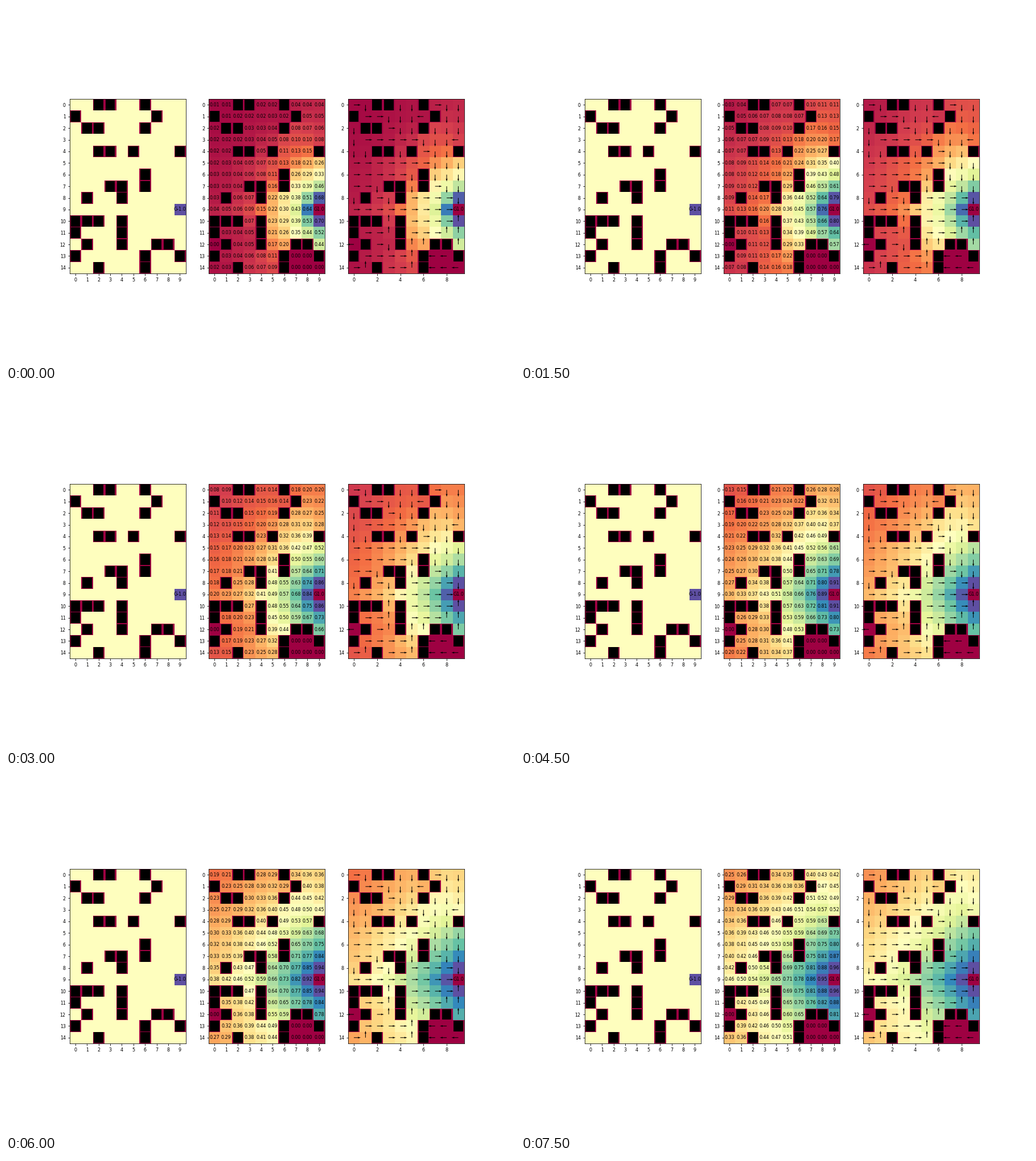
These frames come from a looping animation (894 px wide and 626 px high, 8 s). A matplotlib script:

```python
import numpy as np
import matplotlib.pyplot as plt
from matplotlib.animation import FuncAnimation
from matplotlib.patches import Rectangle

WIDTH, HEIGHT, DPI = 894, 626, 72
STEP_MS, TICKS_PER_STAGE, TICKS = 500, 3, 16
GAMMA = 0.95
GOAL = (9, 9)
GRID = """
..##..#...
#......#..
.##...#...
..........
..##.#...#
..........
......#...
...##.#...
.#..#.....
..........
###.#.....
#...#.....
.#..#..##.
#.....#..#
..#...#...
""".split()

WALL = np.array([[c == "#" for c in row] for row in GRID])
ROWS, COLS = WALL.shape
REWARD = np.zeros(WALL.shape)
REWARD[GOAL] = 1
ACTIVE = ~WALL
ACTIVE[GOAL] = False
MOVES = [(0, -1), (0, 1), (-1, 0), (1, 0)]  # left, right, up, down


def target_cells():
    """Row and column reached by each move; blocked moves stay put."""
    r, c = np.indices(WALL.shape)
    out = []
    for dr, dc in MOVES:
        nr = np.clip(r + dr, 0, ROWS - 1)
        nc = np.clip(c + dc, 0, COLS - 1)
        hit = WALL[nr, nc]
        out.append((np.where(hit, r, nr), np.where(hit, c, nc)))
    return out


TARGETS = target_cells()


def solve(control):
    """Value iteration: `control` weighs the best move against the mean of all."""
    v = np.zeros(WALL.shape)
    for _ in range(500):
        q = np.array([REWARD[t] + GAMMA * v[t] for t in TARGETS])
        best = control * q.max(axis=0) + (1 - control) * q.mean(axis=0)
        v = np.where(ACTIVE, best, 0)
    choice = q.argmax(axis=0)
    u = np.where(ACTIVE, np.array([m[1] for m in MOVES])[choice], 0)
    w = np.where(ACTIVE, -np.array([m[0] for m in MOVES])[choice], 0)
    return v, u, w


STAGES = [solve(0.1 * (k + 1)) for k in range(6)]

plt.rcParams.update({"font.family": "DejaVu Sans", "font.size": 8,
                     "xtick.labelsize": 8, "ytick.labelsize": 8})
fig, axes = plt.subplots(1, 3, figsize=(WIDTH / DPI, HEIGHT / DPI), dpi=DPI)
left, middle, right = axes


def label(ax, row, col, text):
    return ax.text(col, row, text, ha="center", va="center")


def show_grid(ax, data, vmin, vmax, step):
    image = ax.imshow(data, cmap="Spectral", vmin=vmin, vmax=vmax,
                      interpolation="nearest")
    cell = WIDTH * 0.775 / 3.4 / COLS
    w, h = 16.8 / cell, 18.8 / cell
    for r, c in np.argwhere(WALL):
        ax.add_patch(Rectangle((c - w / 2, r - h / 2), w, h, fc="black", lw=0))
    ax.set_xticks(range(0, COLS, step))
    ax.set_yticks(range(0, ROWS, step))
    return image


world = np.where(WALL, -1.0, 0.0)
world[GOAL] = 1
show_grid(left, world, -1, 1, 1)
label(left, *GOAL, "G-1.0")

first, u0, w0 = STAGES[0]
images = [show_grid(middle, first, 0, first.max(), 1),
          show_grid(right, first, 0, first.max(), 2)]
numbers = {(r, c): label(middle, r, c, "") for r, c in np.argwhere(ACTIVE)}
for ax in (middle, right):
    label(ax, *GOAL, "G1.0")
arrows = right.quiver(np.arange(COLS), np.arange(ROWS), u0, w0, color="black")

for ax in axes:
    ax.set_xlim(-0.5, COLS - 0.5)
    ax.set_ylim(ROWS - 0.5, -0.5)


def update(tick):
    values, u, w = STAGES[tick // TICKS_PER_STAGE]
    for image in images:
        image.set_data(values)
        image.set_clim(0, values.max())
    for cell, text in numbers.items():
        text.set_text(f"{values[cell]:.2f}")
    arrows.set_UVC(u, w)
    return [*images, *numbers.values(), arrows]


def reset():
    return update(0)


anim = FuncAnimation(fig, update, frames=TICKS, init_func=reset,
                     interval=STEP_MS, repeat=True, repeat_delay=0)
plt.show()
```
